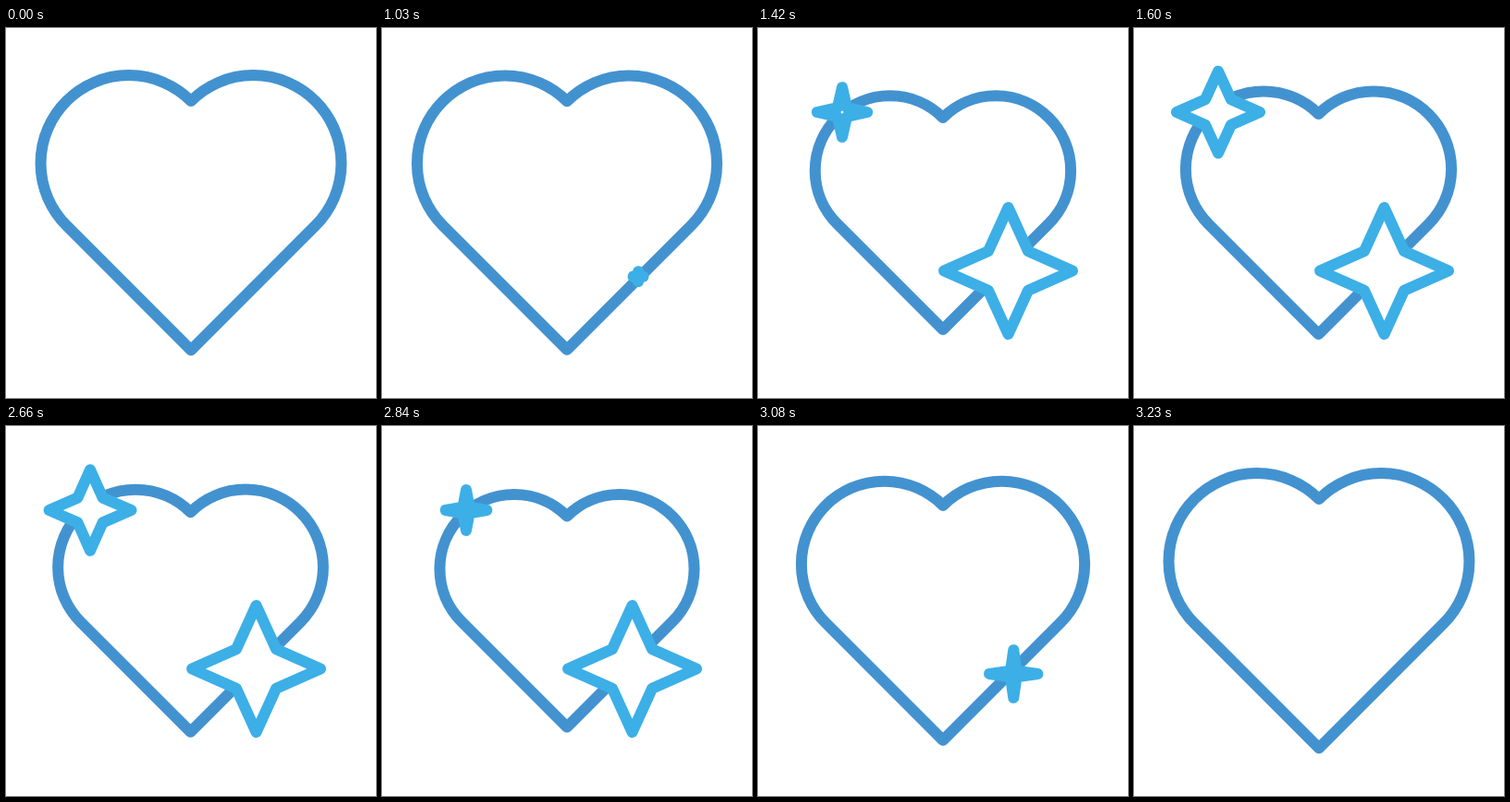
Recreate the animation shown at these times as an HTML page. Size 400x400 px, loop 3260 ms.

```html
<!DOCTYPE html>
<html lang="en">
<head>
<meta charset="utf-8">
<title>Sparkling heart</title>
<style>
  html, body { margin: 0; width: 100%; height: 100%; overflow: hidden; background: #fff; }
  svg { display: block; width: 100%; height: 100%; }
  path { fill: #fff; stroke: #3cafe7; stroke-width: 12; stroke-linejoin: round; }
  #heart { fill: none; stroke: #4392d0; }
</style>
</head>
<body>
<svg viewBox="0 0 400 400">
  <path id="heart"/>
  <path id="large"/>
  <path id="small"/>
</svg>
<script>
const LOOP = 3260, STEP = 30, LAST = 20;
const OPEN_AT = 1000, CLOSE_AT = 2630;

const stars = [
  { el: document.getElementById('large'), x: 270.5, y: 262.5, tip: 69.5, drift: 6.5, start: 0, length: 12.75 },
  { el: document.getElementById('small'), x: 91, y: 91, tip: 45, drift: 0, start: 7, length: 13 }
];
const heart = document.getElementById('heart');

const clamp = (v, lo, hi) => Math.min(hi, Math.max(lo, v));
const ease = x => (1 - Math.cos(Math.PI * clamp(x, 0, 1))) / 2;
const stepsSince = (t, from) => clamp(Math.floor((t - from) / STEP), 0, LAST);

// The heart shrinks past its resting size, then settles back.
function drawHeart(step) {
  const settle = ease((step - 12) / 8);
  const scale = 1 - 0.155 * ease(step / 12) + 0.039 * settle;
  const x = 200 - 0.5 * settle;
  const d = 67.3 * scale, r = d * Math.SQRT2;
  const notch = 200 - 121 * scale;
  heart.setAttribute('d',
    `M${x} ${notch}A${r} ${r} 0 0 0 ${x - 2 * d} ${notch + 2 * d}` +
    `L${x} ${notch + 4 * d}L${x + 2 * d} ${notch + 2 * d}` +
    `A${r} ${r} 0 0 0 ${x} ${notch}Z`);
}

// Tips lead; the waist and the centre follow more slowly.
function drawStar(star, step) {
  const visible = step > star.start;
  star.el.style.display = visible ? '' : 'none';
  if (!visible) return;
  const grow = ease((step - star.start) / star.length);
  const follow = grow * grow;
  const tip = 4.5 + (star.tip - 4.5) * grow;
  const waist = 1 + (star.tip * 0.31 - 1) * follow;
  const cx = star.x + star.drift * (1 - follow);
  const cy = star.y + star.drift * (1 - follow) * 0.95;
  const points = [];
  for (let k = 0; k < 8; k++) {
    const angle = k * Math.PI / 4;
    const radius = k % 2 ? waist * Math.SQRT2 : tip;
    points.push(`${cx + radius * Math.cos(angle)} ${cy + radius * 0.985 * Math.sin(angle)}`);
  }
  star.el.setAttribute('d', `M${points.join('L')}Z`);
}

function render(t) {
  const step = stepsSince(t, OPEN_AT) - stepsSince(t, CLOSE_AT);
  drawHeart(step);
  stars.forEach(star => drawStar(star, step));
}

const begin = performance.now();
function tick() {
  render((performance.now() - begin) % LOOP);
  requestAnimationFrame(tick);
}
tick();
</script>
</body>
</html>
```
